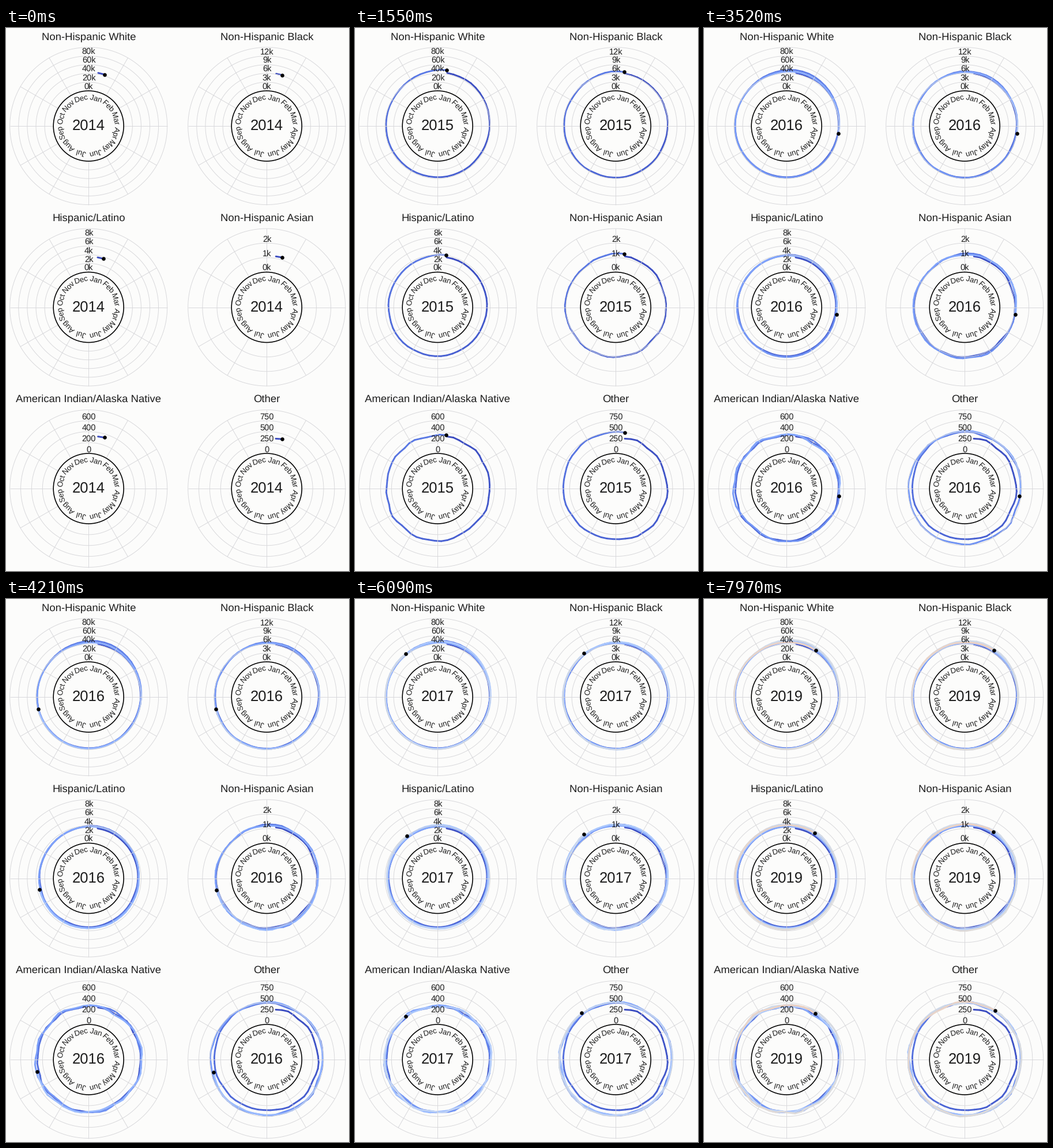
A matplotlib script that plays this animation: 595 by 942 pixels, repeating every 8 s.

```python
import numpy as np
import matplotlib as mpl
import matplotlib.pyplot as plt
from matplotlib.animation import FuncAnimation
from matplotlib.collections import LineCollection
from matplotlib.patches import Circle, PathPatch
from matplotlib.path import Path
from matplotlib.textpath import TextPath
from matplotlib.transforms import Affine2D

W, H, DPI = 595, 942, 64
LOOP, WEEKS = 8000, 264
FRAMES = WEEKS + 1  # the last week is held for one extra frame
FONT = "Liberation Sans"
BG, INK, GRID = "#fcfcfb", "#1c1c1c", "#d6d6d9"
R_IN, R_OUT = 61, 136.5
COLS, ROWS = (143.2, 452.2), (170, 484.5, 799)
MONTHS = "Jan Feb Mar Apr May Jun Jul Aug Sep Oct Nov Dec".split()
COLOR_SPAN = 455  # weeks covered by the whole colour map

# title, top of scale, tick step, unit, rings,
# then radius: base, yearly growth, winter bump, late-2014 rise, roughness
PANELS = [
    ("Non-Hispanic White", 80, 20, "k", 5, 88.6, 0.42, 9.2, 0, 0.2),
    ("Non-Hispanic Black", 12, 3, "k", 5, 88.8, 0.65, 6, 0, 0.35),
    ("Hispanic/Latino", 8, 2, "k", 5, 84.3, 1.0, 6.6, 0, 0.3),
    ("Non-Hispanic Asian", 2, 1, "k", 3, 86.2, 1.0, 6.6, 0, 0.8),
    ("American Indian/Alaska Native", 600, 200, "", 4, 89.6, 0.7, 3.3, 0, 1.5),
    ("Other", 750, 250, "", 4, 89.2, 0.2, 2.5, 7.5, 1.1),
]
SEVERITY = (0.58, 1.05, 0.62, 0.85, 1.1, 0.55)  # winters 2014 to 2019

plt.rcParams["text.hinting"] = "none"
rng = np.random.default_rng(14)

# One point per week, starting on 11 January 2014
day = 10 + 7 * np.arange(WEEKS + 1)
year_start = np.array([0, 365, 730, 1096, 1461, 1826])
year = np.searchsorted(year_start, day, side="right") - 1
turn = (day - year_start[year] + 0.4) / 365
t = year + turn
angle = 2 * np.pi * turn
winter = (np.exp(2.3 * (np.cos(angle - np.radians(22)) - 1))
          * np.interp(t, np.arange(6), SEVERITY))
late_rise = 1 / (1 + np.exp(-16 * (t - 0.79)))


def weekly_radius(base, growth, bump, rise, rough):
    noise = np.convolve(rng.normal(size=len(t) + 2), (0.4, 0.8, 0.4), "valid")
    return base + growth * t + bump * winter + rise * late_rise + rough * noise


def polar(cx, cy, r, a):
    return np.stack([cx + r * np.sin(a), cy - r * np.cos(a)], axis=-1)


def pt(px):
    return px * 72 / DPI


fig = plt.figure(figsize=(W / DPI, H / DPI), dpi=DPI, facecolor=BG)
ax = fig.add_axes([0, 0, 1, 1])
ax.set(xlim=(0, W), ylim=(H, 0))
ax.axis("off")


def label(x, y, s, px):
    return ax.text(x, y, s, fontsize=pt(px), family=FONT, color=INK,
                   ha="center", va="baseline", zorder=4)


def month_paths(cx, cy):
    for m, name in enumerate(MONTHS):
        glyphs = TextPath((0, 0), name, size=13.2, prop={"family": FONT})
        box = glyphs.get_extents()
        place = (Affine2D().translate(-(box.x0 + box.x1) / 2, -4.6)
                 .scale(1, -1).translate(0, -49.7)
                 .rotate_deg(15 + 30 * m).translate(cx, cy))
        yield place.transform_path(glyphs)


grid, months, tracks, years = [], [], [], []
circle = np.linspace(0, 2 * np.pi, 181)
for n, (title, top, tick, unit, rings, *shape) in enumerate(PANELS):
    cx, cy = COLS[n % 2], ROWS[n // 2]
    step = (R_OUT - R_IN) / rings
    grid += [polar(cx, cy, R_IN + step * i, circle)
             for i in range(1, rings + 1)]
    grid += [polar(cx, cy, np.array([R_IN, R_OUT]), np.radians(a))
             for a in range(0, 360, 30)]
    ax.add_patch(Circle((cx, cy), R_IN, fill=False, ec="black",
                        lw=pt(1.6), zorder=3))
    label(cx + 0.2, cy - 149.8, title, 18.45)
    for i, value in enumerate(range(0, top + 1, tick)):
        label(cx + 0.4, cy - R_IN - step * i - 2.5, f"{value}{unit}", 14.6)
    years.append(label(cx, cy + 7.2, "2014", 25.6))
    months += month_paths(cx, cy)
    tracks.append(polar(cx, cy, weekly_radius(*shape), angle))

ax.add_collection(LineCollection(grid, colors=GRID, lw=pt(0.9), zorder=2))
ax.add_patch(PathPatch(Path.make_compound_path(*months), fc=INK, lw=0,
                       zorder=4))

tracks = np.array(tracks)
segments = np.stack([tracks[:, :-1], tracks[:, 1:]], axis=2)
colors = mpl.colormaps["coolwarm"](np.arange(WEEKS) / COLOR_SPAN)
trail = LineCollection([], lw=pt(2.9), capstyle="round", zorder=1)
ax.add_collection(trail, autolim=False)
dots, = ax.plot([], [], "o", color="black", ms=pt(6.6), mew=0, zorder=5)


def draw(frame):
    k = min(frame + 1, WEEKS)
    trail.set_segments(segments[:, :k].reshape(-1, 2, 2))
    trail.set_color(np.tile(colors[:k], (len(PANELS), 1)))
    dots.set_data(tracks[:, k, 0], tracks[:, k, 1])
    for text in years:
        text.set_text(str(2014 + year[k]))
    return [trail, dots, *years]


anim = FuncAnimation(fig, draw, frames=FRAMES, interval=LOOP / FRAMES,
                     init_func=lambda: draw(0), repeat=True, repeat_delay=0)
plt.show()
```
